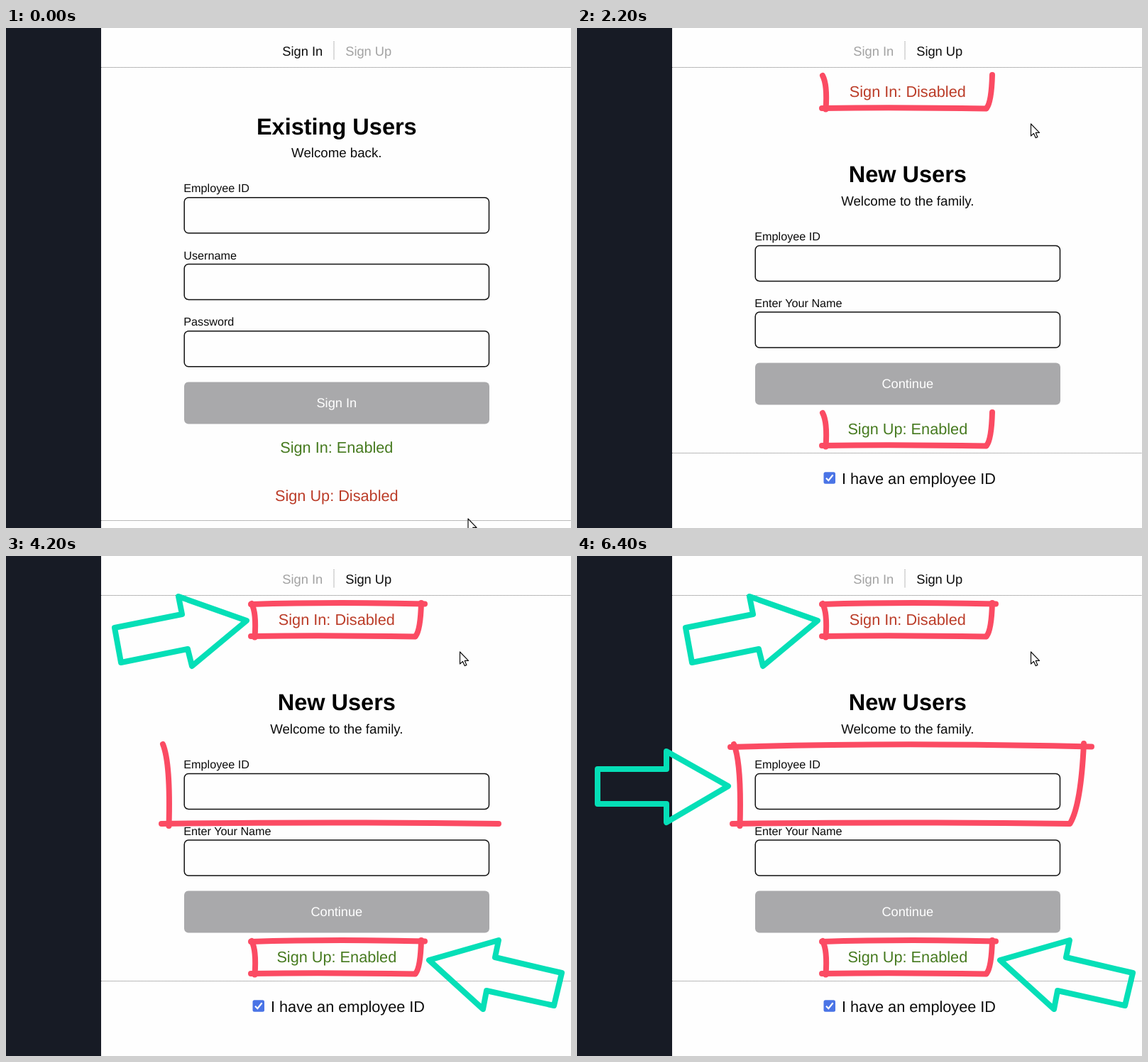
An HTML page for the animation above (7400 ms loop, 796 by 704 pixels).

```html
<!DOCTYPE html>
<html lang="en">
<head>
<meta charset="utf-8">
<title>Sign in and sign up form</title>
<style>
  html, body { margin: 0; width: 100%; height: 100%; overflow: hidden; background: #fefefe; }
  svg { display: block; width: 796px; height: 704px; }
  text { font-family: "Liberation Sans", Arial, sans-serif; text-rendering: geometricPrecision; fill: #0c0c0c; }
  .mid text { text-anchor: middle; }
  .nav { font-size: 18.3px; }
  .off { fill: #a2a2a2; }
  .hover { text-decoration: underline; }
  .mid .title { font-size: 32.5px; font-weight: bold; fill: #000; }
  .lead { font-size: 18.7px; }
  .label { font-size: 16.2px; }
  .status { font-size: 21.7px; }
  .mid .yes { fill: #467a1f; }
  .mid .no { fill: #bb3c28; }
  .mid .action { font-size: 18.2px; fill: #fff; }
  .field { fill: #fefefe; stroke: #111; stroke-width: 1.5; }
  .button { fill: #a9a9ab; }
  .rule { stroke: #777; stroke-width: 1; stroke-dasharray: 1 1; }
  .ink { fill: none; stroke-width: 8; stroke-linecap: round; stroke-linejoin: round; }
  .red { stroke: #fb4b63; }
  .teal { stroke: #05dfb7; }
  .pointer path { fill: #fff; stroke: #111; stroke-width: 1.2; stroke-linejoin: round; }
</style>
</head>
<body>
<svg viewBox="0 0 796 704">
  <defs>
    <rect id="field" class="field" x="251.2" width="429.3" height="50" rx="6"/>
    <rect id="button" class="button" x="251" width="430" height="59" rx="6"/>
  </defs>
  <rect width="796" height="704" fill="#fefefe"/>
  <rect width="134" height="704" fill="#171b25"/>

  <text id="navIn" class="nav" x="389.3" y="38.7">Sign In</text>
  <text id="navUp" class="nav" x="478.2" y="38.7">Sign Up</text>
  <path class="rule" d="M462 19V45M134 55.5H796"/>

  <g id="signIn">
    <g class="mid" transform="translate(465.8)">
      <text class="title" y="149.7">Existing Users</text>
      <text class="lead" y="182.4">Welcome back.</text>
    </g>
    <text class="label" x="250.3" y="231.2">Employee ID</text>
    <text class="label" x="250.3" y="325.6">Username</text>
    <text class="label" x="250.3" y="419">Password</text>
    <use href="#field" y="238.8"/>
    <use href="#field" y="332.4"/>
    <use href="#field" y="426.8"/>
    <use href="#button" y="498.5"/>
    <g class="mid" transform="translate(465.8)">
      <text class="action" y="534">Sign In</text>
      <text class="status yes" y="598.3">Sign In: Enabled</text>
      <text class="status no" y="666">Sign Up: Disabled</text>
    </g>
    <path class="rule" d="M134 693.5H796"/>
  </g>

  <g id="signUp">
    <g class="mid" transform="translate(465.8)">
      <text class="status no" y="96.7">Sign In: Disabled</text>
      <text class="title" y="217.3">New Users</text>
      <text class="lead" y="250">Welcome to the family.</text>
    </g>
    <text class="label" x="250.3" y="298.8">Employee ID</text>
    <text class="label" x="250.3" y="393.2">Enter Your Name</text>
    <use href="#field" y="306.4"/>
    <use href="#field" y="400"/>
    <use href="#button" y="471.5"/>
    <g class="mid" transform="translate(465.8)">
      <text class="action" y="507">Continue</text>
      <text class="status yes" y="571.6">Sign Up: Enabled</text>
    </g>
    <path class="rule" d="M134 598.5H796"/>
    <rect x="347.5" y="625.3" width="16.5" height="16.5" rx="2.5" fill="#4a74e6"/>
    <path d="M351 633.8L354.3 637.2L360.6 629.3" fill="none" stroke="#fff" stroke-width="2.2"/>
    <text class="status" x="373" y="642.3">I have an employee ID</text>
  </g>

  <g id="marks"></g>

  <g id="arrow" class="pointer">
    <path d="M0 0V17L4 13.4L6.7 19.6L9.4 18.4L6.8 12.4H12Z"/>
  </g>
  <g id="hand" class="pointer">
    <path d="M-1.8 1.5Q0 -1.3 1.8 1.5V8Q3.4 6.8 4.8 8.6Q6.4 7.6 7.6 9.4Q10.4 8.8 10.6 12V16Q10.4 19.5 8.4 21.5V24H-1.6V21.8Q-4.6 18.4 -6.6 14.6Q-7.4 11.6 -4.6 12.4L-1.8 15Z"/>
    <path d="M1.8 8V12.5M4.8 8.8V13M7.7 9.6V13.5" fill="none"/>
  </g>
</svg>
<script>
  const LOOP = 7400, STEP = 200, SWITCH = 1400;
  const $ = id => document.getElementById(id);
  const clamp = v => Math.min(1, Math.max(0, v));
  const ease = v => v * v * (3 - 2 * v);
  const strokes = [];

  function addStroke(color, d, start, length, dy = 0) {
    const el = document.createElementNS("http://www.w3.org/2000/svg", "path");
    el.setAttribute("class", "ink " + color);
    el.setAttribute("d", d);
    el.setAttribute("pathLength", 1);
    el.setAttribute("transform", `translate(0 ${dy})`);
    $("marks").append(el);
    strokes.push({ el, start, length });
  }

  // The four sides of a box follow one another.
  const addBox = (sides, start, dy) =>
    sides.forEach((d, i) => addStroke("red", d, start + i * STEP, STEP, dy));
  const addArrow = (d, start) => addStroke("teal", d, start, 565);

  const smallBox = [
    "M346 67Q353 80 350.5 114.5",
    "M345 113Q450 111.5 576 113.5",
    "M577 113Q584 104 585 66",
    "M345 68Q460 64.5 590 67.5"
  ];
  const bigBox = [
    "M221 265Q232 292 229.5 380",
    "M219 377Q460 374 694 377",
    "M695 376Q710 350 714 264",
    "M216 269Q450 262 725 268.5"
  ];
  addBox(smallBox, 1600, 0);
  addBox(smallBox, 1600, 475);
  addArrow("M248 82L243 57L339 91L262 155L256 131L162 150L153 101Z", 2400);
  addArrow("M677 612L672 638L596 569L694 541L689 565L783 587L772 633Z", 2400);
  addBox(bigBox, 3800, 0);
  addArrow("M126 300V275L213 324L126 375V349H29V300Z", 4600);

  function pointerAt(t) {
    const first = t < SWITCH;
    const [x0, y0, x1, y1] = first ? [651, 691, 527.5, 42] : [527, 41, 639.5, 135];
    const p = ease(clamp(first ? t / 1000 : (t - SWITCH) / 600));
    return [x0 + (x1 - x0) * p, y0 + (y1 - y0) * p];
  }

  const show = (el, on) => el.setAttribute("visibility", on ? "visible" : "hidden");

  function draw(t) {
    const joined = t >= SWITCH;
    const hover = t >= 1000 && !joined;
    show($("signIn"), !joined);
    show($("signUp"), joined);
    $("navIn").classList.toggle("off", joined);
    $("navUp").classList.toggle("off", !joined && !hover);
    $("navUp").classList.toggle("hover", hover);

    const place = `translate(${pointerAt(t).join(" ")})`;
    for (const id of ["arrow", "hand"]) {
      $(id).setAttribute("transform", place);
      show($(id), (id === "hand") === hover);
    }

    for (const { el, start, length } of strokes) {
      const p = clamp((t - start) / length);
      show(el, p > 0);
      el.setAttribute("stroke-dasharray", p < 1 ? `${p} 2` : "none");
    }
  }

  const origin = performance.now();
  function tick() {
    const t = (performance.now() - origin) % LOOP;
    draw(Math.floor(t / STEP) * STEP);
    requestAnimationFrame(tick);
  }
  draw(0);
  requestAnimationFrame(tick);
</script>
</body>
</html>
```
